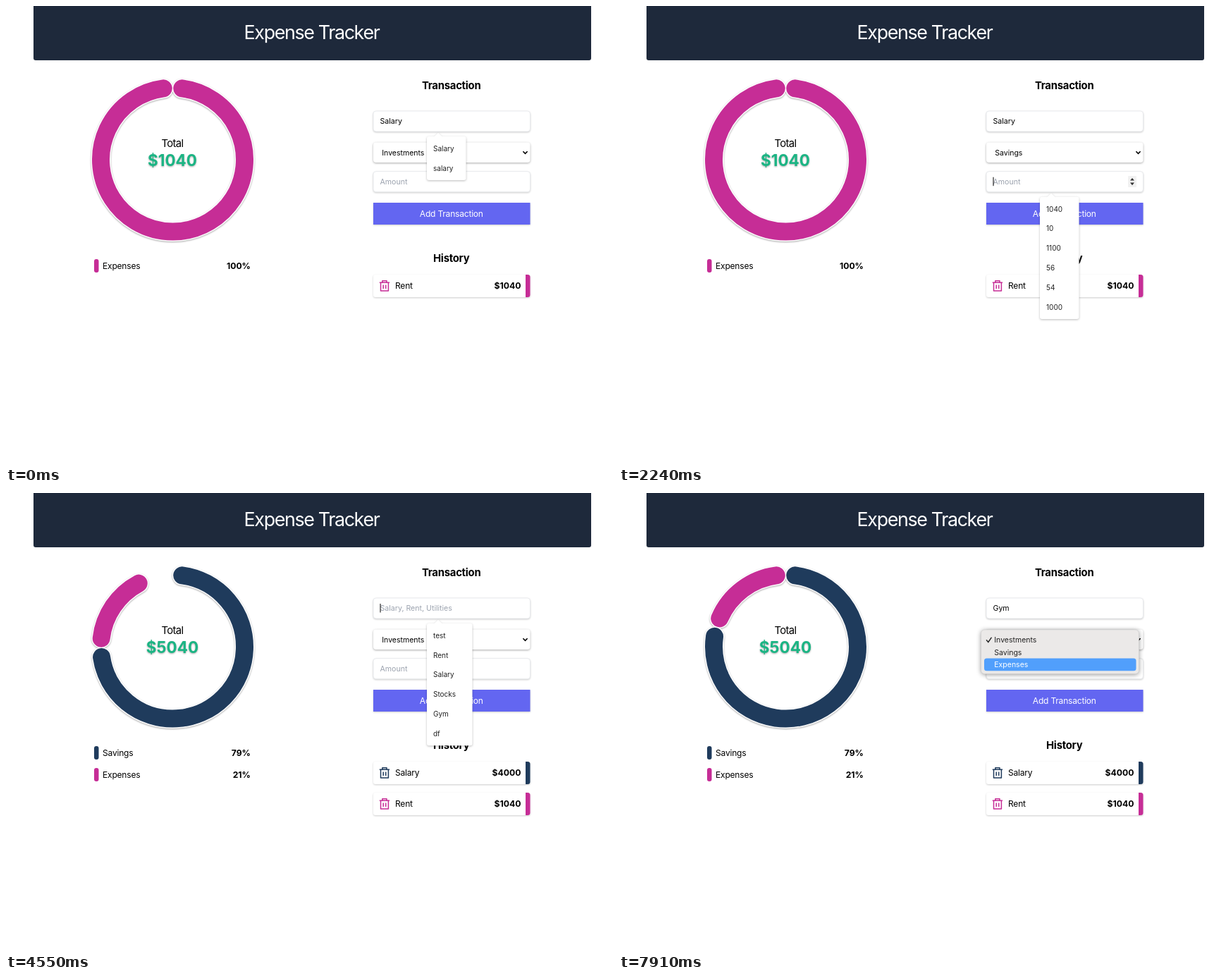
These frames come from a looping animation (861 by 651 pixels, 8000 ms). An HTML page:

```html
<!DOCTYPE html>
<html lang="en">
<head>
<meta charset="utf-8">
<title>Expense Tracker</title>
<style>
  html, body { margin: 0; width: 100%; height: 100%; overflow: hidden; background: #fff; }
  svg { display: block; font-family: Inter, Roboto, sans-serif; font-optical-sizing: none; }
  .title { font-size: 26.8px; letter-spacing: -.05em; fill: #fff; }
  .heading { font-size: 14.8px; font-weight: 700; letter-spacing: -.015em; }
  .label { font-size: 12px; letter-spacing: -.016em; }
  .value { font-size: 12.2px; font-weight: 700; }
  .field { font-size: 10.6px; }
  .item { font-size: 10.5px; }
  .hint { font-size: 10px; fill: #222; }
  .total { font-size: 14.8px; letter-spacing: -.04em; }
  .sum { font-size: 22.5px; font-weight: 700; fill: #1bb584; filter: drop-shadow(0 1px 1px #0005); }
  .card { filter: drop-shadow(0 1px 1px #0003); }
  .select { filter: drop-shadow(0 1px 1.5px #0005); }
  .popup { filter: drop-shadow(0 1px 1.5px #0004); }
  .menu { filter: drop-shadow(0 1px 3px #0006); }
  .ring { filter: drop-shadow(0 1px 1px #0005); }
</style>
</head>
<body>
<svg id="stage" width="861" height="651" viewBox="0 0 861 651"></svg>
<script>
const PINK = '#c62d96', NAVY = '#1f3b5c', GREY = '#9ca3af', LOOP = 8000, TICK = 70;
const CATEGORIES = ['Investments', 'Savings', 'Expenses'];
const stage = document.getElementById('stage');
const pen = document.createElement('canvas').getContext('2d');
pen.font = '10.6px Inter, Roboto, sans-serif';

const text = (x, y, cls, str, fill = '#000', anchor = 'start') =>
  `<text x="${x}" y="${y}" class="${cls}" style="fill:${fill}" text-anchor="${anchor}">${str}</text>`;
const rect = (x, y, w, h, r, fill, extra = '') =>
  `<rect x="${x}" y="${y}" width="${w}" height="${h}" rx="${r}" fill="${fill}" ${extra}/>`;
const line = (d, stroke, width, extra = '') =>
  `<path d="${d}" fill="none" stroke="${stroke}" stroke-width="${width}" ${extra}/>`;

// Value of the last [time, value] step that has been reached.
const at = (t, steps) => steps.reduce((v, [from, next]) => t >= from ? next : v, undefined);

function arc(from, to) {
  const point = deg => {
    const a = deg * Math.PI / 180;
    return `${(236.5 + 102 * Math.sin(a)).toFixed(2)} ${(218 - 102 * Math.cos(a)).toFixed(2)}`;
  };
  return `M${point(from)}A102 102 0 ${to - from > 180 ? 1 : 0} 1 ${point(to)}`;
}

function ring(parts, progress) {
  let start = 0, back = '', front = '';
  for (const [color, share] of parts) {
    const sweep = 360 * share * progress, end = start + sweep;
    const round = sweep > 16, inset = round ? 7.46 : .5;
    if (sweep > 1.5) {
      const d = arc(start + inset, end - inset);
      const cap = `stroke-linecap="${round ? 'round' : 'butt'}"`;
      back += round ? line(d, '#fff', 28, cap) : line(arc(start, end + .6), '#fff', 28);
      front += line(d, color, 25, cap);
    }
    start = end;
  }
  return `<g class="ring">${back}${front}</g>`;
}

function legend(row, name, percent, color) {
  const y = 359 + row * 31;
  return rect(125, y, 6.5, 19, 3, color) + text(137, y + 13.9, 'label', name)
    + text(347, y + 13.9, 'value', percent, '#000', 'end');
}

function record(row, name, amount, color) {
  const y = 381 + row * 44;
  return `<g class="card">${rect(521, y, 222.5, 32, 3, '#fff')}</g>`
    + `<path d="M737 ${y}h3q3.5 0 3.5 3.5v25q0 3.5 -3.5 3.5h-3z" fill="${color}"/>`
    + line(`M529.8 ${y + 11.2}h14.2M533.8 ${y + 11}v-2.2h6.2v2.2M531.5 ${y + 11.2}v11.9h10.9v-11.9`
      + `M535.2 ${y + 14.5}v5.6M538.7 ${y + 14.5}v5.6`, color, 1.5, 'stroke-linejoin="round"')
    + text(552, y + 20.2, 'label', name) + text(730.5, y + 20.2, 'value', amount, '#000', 'end');
}

function input(y, value, placeholder, caret) {
  const x = 530.5 + (value ? pen.measureText(value).width : 0);
  return `<g class="card">${rect(521, y, 222.5, 29, 4, '#fff', 'stroke="#e5e7eb" stroke-width=".8"')}</g>`
    + text(530.5, y + 18, 'field', value || placeholder, value ? '#000' : GREY)
    + (caret ? rect(x, y + 8, 1, 12.5, 0, '#000') : '');
}

function popup(y, width, rows) {
  return `<g class="popup"><path d="M607 ${y + .5}l6 -5.5l6 5.5z" fill="#fff"/>`
    + rect(597, y, width, rows.length * 27.8 + 6.5, 3, '#fff') + '</g>'
    + rows.map((row, i) => text(606, y + 20.8 + i * 27.8, 'hint', row, '#222')).join('');
}

function menu(active, opacity) {
  const rows = CATEGORIES.map((name, i) => {
    const y = 198.8 + i * 17.8, on = i === active, ink = on ? '#fff' : '#222';
    return (on ? rect(518, y, 215.5, 17.8, 3.5, '#519ffc') : '')
      + (i ? '' : line('M521.4 208.8l2.4 2.7l4.4 -6.3', ink, 1.4, 'stroke-linecap="round"'))
      + text(532.3, y + 13, 'item', name, ink);
  });
  return `<g opacity="${opacity}"><g class="menu">`
    + rect(513.5, 194, 224, 62.5, 5, '#ebe9e8', 'stroke="#c8c8c8" stroke-width=".5"')
    + `</g>${rows.join('')}</g>`;
}

function draw(t) {
  const saved = t >= 4060;
  const name = at(t, [[0, 'Salary'], [3990, ''], [5180, 'G'], [5390, 'Gy'], [5600, 'Gym']]);
  const amount = at(t, [[0, ''], [2310, '4'], [2520, '40'], [2730, '400'], [2940, '4000'], [3990, '']]);
  const category = at(t, [[0, 0], [1400, 1], [3990, 0]]);
  const nameCaret = at(t, [[0, false], [4480, true], [4970, false], [5180, true], [6090, false]]);
  const amountCaret = at(t, [[0, false], [1750, true], [3360, false]]);
  const spinner = t >= 1750 && t < 3850;
  const menuOpacity = at(t, [[0, 0], [280, 1], [1400, .7], [1470, .35], [1540, 0], [6650, 1]]);
  const active = at(t, [[0, -1], [350, 0], [1050, 1], [1190, -1], [1260, 1],
    [1540, -1], [6720, 0], [7140, 1], [7630, 2]]);
  const hints = at(t, [
    [0, [185, 55.5, ['Salary', 'salary']]], [140, null],
    [1750, [270.7, 55.5, ['1040', '10', '1100', '56', '54', '1000']]], [2310, null],
    [4480, [185, 64.5, ['test', 'Rent', 'Salary', 'Stocks', 'Gym', 'df']]],
    [5180, [185, 55.5, ['Gym']]], [5600, null]]);

  const share = 4000 / 5040;
  const parts = saved ? [[NAVY, share], [PINK, 1 - share]] : [[PINK, 1]];
  const progress = saved ? 1 - (1 - Math.min(1, (t - 4058) / 965)) ** 4 : 1;

  return rect(0, 0, 861, 651, 0, '#fff')
    + '<path d="M39 0h791v74q0 3 -3 3h-785q-3 0 -3 -3z" fill="#1e293b"/>'
    + text(433.5, 47.2, 'title', 'Expense Tracker', '#fff', 'middle')
    + ring(parts, progress)
    + text(236, 200.3, 'total', 'Total', '#000', 'middle')
    + text(236, 226.6, 'sum', saved ? '$5040' : '$1040', '#1bb584', 'middle')
    + (saved ? legend(0, 'Savings', '79%', NAVY) + legend(1, 'Expenses', '21%', PINK)
      : legend(0, 'Expenses', '100%', PINK))
    + text(631.7, 118.4, 'heading', 'Transaction', '#000', 'middle')
    + input(149, name, 'Salary, Rent, Utilities', nameCaret)
    + `<g class="select">${rect(521, 193.5, 222.5, 28.5, 4, '#fff')}</g>`
    + text(533.3, 211.8, 'item', CATEGORIES[category])
    + line('M733.4 206.2l3.1 3.1l3.1 -3.1', '#000', 1.6)
    + input(234.7, amount, 'Amount', amountCaret)
    + (spinner ? rect(722, 241, 12, 16, 1, '#f1f1f1')
      + '<path d="M725 247.6l3 -3.6l3 3.6zM725 250.6l3 3.6l3 -3.6z" fill="#333"/>' : '')
    + `<g class="card">${rect(521, 279, 222.5, 31, 0, '#6366f1')}</g>`
    + text(631.8, 299, 'label', 'Add Transaction', '#fff', 'middle')
    + text(631.7, 363.4, 'heading', 'History', '#000', 'middle')
    + (saved ? record(0, 'Salary', '$4000', NAVY) : '')
    + record(saved ? 1 : 0, 'Rent', '$1040', PINK)
    + (hints ? popup(...hints) : '')
    + (menuOpacity ? menu(active, menuOpacity) : '');
}

let shown = '';
function frame() {
  const t = performance.now() % LOOP;
  const markup = draw(Math.floor(t / TICK) * TICK);
  if (markup !== shown) stage.innerHTML = shown = markup;
  requestAnimationFrame(frame);
}
frame();
</script>
</body>
</html>
```
